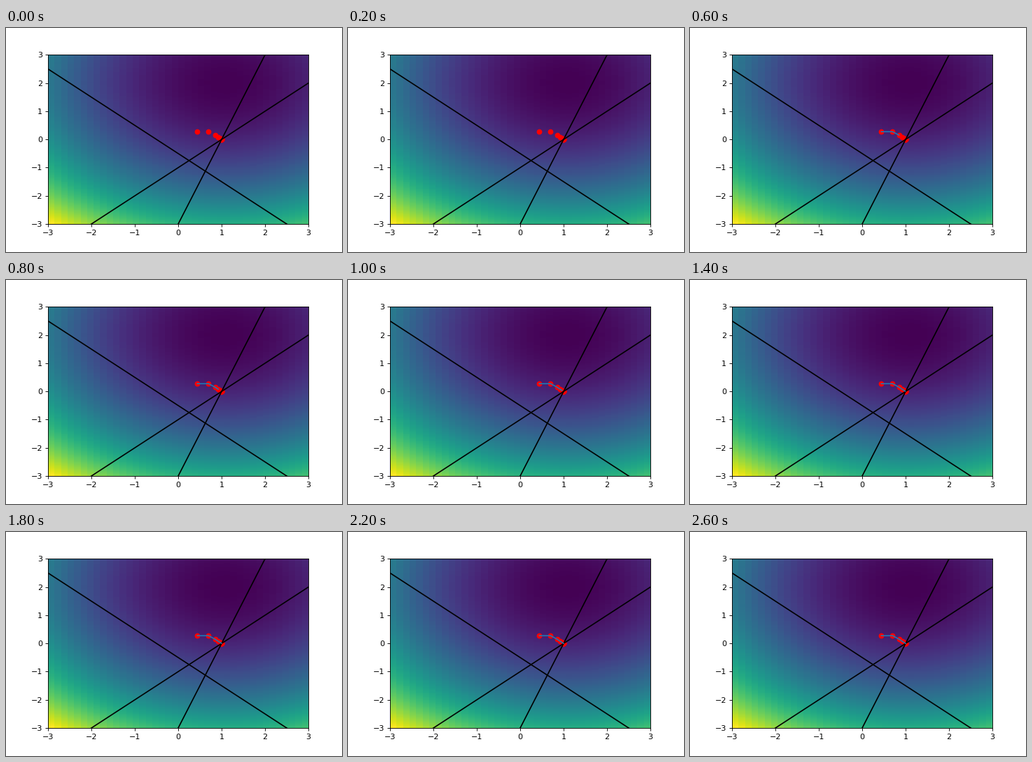
Write a matplotlib script that moves like this. It is 480 by 320 pixels and loops after 2800 ms.

```python
import numpy as np
import matplotlib.pyplot as plt
from matplotlib.animation import FuncAnimation

FRAMES = 14
LIMIT = 3
DX, DY = 0.15, 0.05


def objective(x, y):
    return (x - 1) ** 2 + (y - 2) ** 2


plt.rcParams.update({"font.family": "DejaVu Sans", "font.size": 10})
fig, ax = plt.subplots(figsize=(6, 4), dpi=80)
fig.subplots_adjust(left=0.125, right=0.9, bottom=0.125, top=0.88)

# Cost surface, one colour per cell taken at its lower left corner
x_edges = np.linspace(-LIMIT, LIMIT, round(2 * LIMIT / DX) + 1)
y_edges = np.linspace(-LIMIT, LIMIT, round(2 * LIMIT / DY) + 1)
cost = objective(*np.meshgrid(x_edges[:-1], y_edges[:-1]))
ax.pcolormesh(x_edges, y_edges, cost, cmap="viridis", shading="flat")

# Constraint boundaries y = slope * x + offset
span = np.array([-LIMIT, LIMIT])
for slope, offset in [(-1, -0.5), (1, -1), (3, -3)]:
    ax.plot(span, slope * span + offset, color="black", lw=1.5)

# Iterates: the gap to the optimum at (1, 0) halves every step
gap = 0.153 * 0.5 ** np.arange(FRAMES - 2)
path_x = np.concatenate([[0.44, 0.70], 1 - gap])
path_y = np.concatenate([[0.275, 0.275], gap])
ax.scatter(path_x, path_y, s=36, color="red")
trail, = ax.plot([], [], color="C0", lw=1.5)

ax.set_xlim(-LIMIT, LIMIT)
ax.set_ylim(-LIMIT, LIMIT)
ax.set_xticks(range(-LIMIT, LIMIT + 1))
ax.set_yticks(range(-LIMIT, LIMIT + 1))


def update(step):
    trail.set_data(path_x[:step], path_y[:step])
    return trail,


anim = FuncAnimation(fig, update, frames=FRAMES, interval=200, repeat=True)
plt.show()
```
